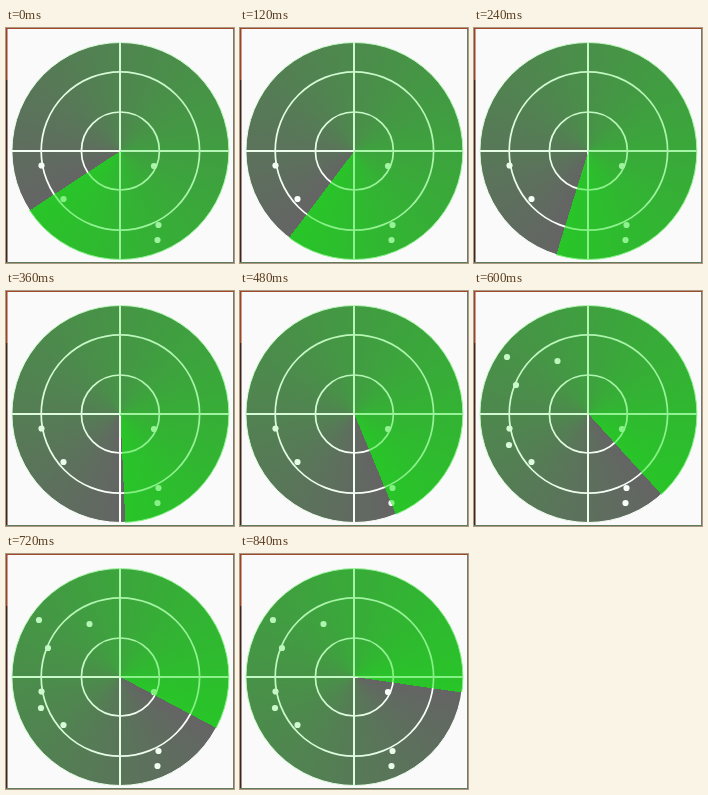
These frames come from a looping animation (228 by 235 pixels, 960 ms). An HTML page with a canvas:

```html
<!DOCTYPE html>
<html>
<head>
<meta charset="utf-8">
<style>
  html, body { margin: 0; width: 100%; height: 100%; overflow: hidden; background: #fafafa; }
  canvas { display: block; }
</style>
</head>
<body>
<canvas id="radar" width="228" height="235"></canvas>
<script>
const ctx = document.getElementById('radar').getContext('2d');
const CX = 114.4, CY = 123, RADIUS = 108.5;
const STEP_MS = 120, STEPS = 8, LATE_STEP = 5;
const START_ANGLE = 146.8, STEP_ANGLE = 19.8;

const blips = [[35.5, 137.5], [57.5, 171], [148, 138], [152.5, 197], [151.5, 212]];
const lateBlips = [[33, 66], [83.5, 70], [42, 94], [35, 154]];

function sweep(angle, from, to) {
  const gradient = ctx.createConicGradient(angle, CX, CY);
  gradient.addColorStop(0, from);
  gradient.addColorStop(1, to);
  return gradient;
}

function circle(x, y, r) {
  ctx.beginPath();
  ctx.arc(x, y, r, 0, 2 * Math.PI);
}

function rect(color, x, y, w, h) {
  ctx.fillStyle = color;
  ctx.fillRect(x, y, w, h);
}

function drawSurround() {
  rect('#fafafa', 0, 0, 228, 235);
  rect('#a04a2c', 0, 0, 228, 1);
  rect('#9a4528', 0, 0, 1.5, 52);
  rect('#40241e', 0, 52, 1.5, 183);
  rect('#77786c', 227, 1, 1, 234);
  rect('#5f7a5c', 0, 234, 228, 1);
}

function draw(step) {
  const angle = (START_ANGLE - STEP_ANGLE * step) * Math.PI / 180;
  const light = sweep(angle, '#ffffff', '#80f080');

  drawSurround();
  circle(CX, CY, RADIUS);
  ctx.fillStyle = sweep(angle, '#646464', '#28c528');
  ctx.fill();

  ctx.strokeStyle = ctx.fillStyle = light;
  ctx.lineWidth = 1;
  ctx.stroke();

  ctx.lineWidth = 1.7;
  for (const r of [39, 79.2]) {
    circle(CX, CY, r);
    ctx.stroke();
  }
  ctx.fillRect(CX - RADIUS, 122, 2 * RADIUS, 2);
  ctx.fillRect(113, CY - RADIUS, 2, 2 * RADIUS);

  const visible = step >= LATE_STEP ? [...blips, ...lateBlips] : blips;
  for (const [x, y] of visible) {
    circle(x, y, 3.1);
    ctx.fill();
  }
}

function frame() {
  draw(Math.floor(performance.now() / STEP_MS) % STEPS);
  requestAnimationFrame(frame);
}
frame();
</script>
</body>
</html>
```
